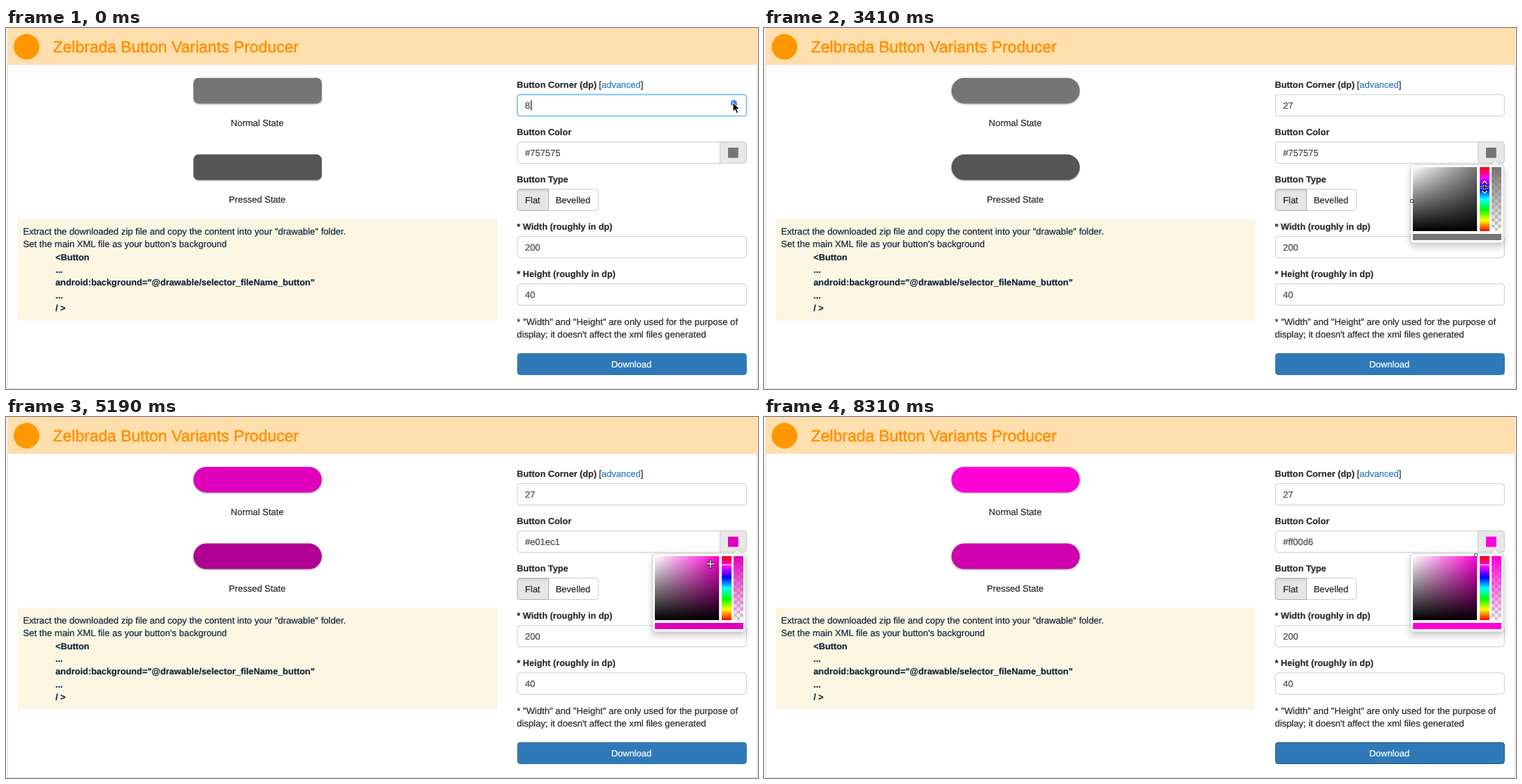
Write an HTML page that moves like this. It is 1079 px wide and 519 px high and loops after 8910 ms.

```html
<!DOCTYPE html>
<html lang="en">
<head>
<meta charset="utf-8">
<title>Button Variants Producer</title>
<style>
  html, body { margin: 0; width: 100%; height: 100%; overflow: hidden; background: #fff; }
  svg { display: block; width: 100%; height: 100%; }
  text {
    font: 13px "Liberation Sans", Arial, sans-serif; white-space: pre;
    text-rendering: geometricPrecision;
    color: #2b2b2b; fill: currentColor; stroke: currentColor; stroke-width: .22;
  }
  .title { font-size: 23px; color: #ff9100; stroke-width: .6; }
  .bold { font-size: 12.8px; font-weight: 700; }
  .note { font-size: 13.13px; }
  .code text { color: #12263a; }
  .mid { text-anchor: middle; }
  .value { color: #484848; }
  .field { fill: #fff; stroke: #ccc; }
  .field.focus { stroke: #5aaeef; stroke-width: 1.2; filter: drop-shadow(0 0 2.5px rgba(102, 175, 233, .4)); }
  .shape { filter: drop-shadow(0 1px 1px rgba(0, 0, 0, .38)); }
  .panel { filter: drop-shadow(0 5px 5px rgba(0, 0, 0, .2)); }
  .download { fill: #2f79b9; stroke: #2e6da4; }
  .download.hover { fill: #286090; stroke: #204d74; }
  .download.down { fill: #204d74; stroke: #122b40; }
  .download.done { stroke: #1f4a70; }
  .line { fill: none; stroke: #000; }
  .halo { fill: none; stroke: #fff; stroke-width: 3; }
  .solid { stroke: #fff; stroke-width: 1; stroke-linejoin: round; }
</style>
</head>
<body>
<svg viewBox="0 0 1079 519" preserveAspectRatio="none">
  <defs>
    <linearGradient id="white">
      <stop stop-color="#fff"/><stop offset="1" stop-color="#fff" stop-opacity="0"/>
    </linearGradient>
    <linearGradient id="black" x2="0" y2="1">
      <stop stop-color="#000" stop-opacity="0"/><stop offset="1"/>
    </linearGradient>
    <linearGradient id="rainbow" x2="0" y2="1">
      <stop stop-color="#f00"/><stop offset=".167" stop-color="#f0f"/>
      <stop offset=".333" stop-color="#00f"/><stop offset=".5" stop-color="#0ff"/>
      <stop offset=".667" stop-color="#0f0"/><stop offset=".833" stop-color="#ff0"/>
      <stop offset="1" stop-color="#f00"/>
    </linearGradient>
    <linearGradient id="fade" x2="0" y2="1">
      <stop class="tint"/><stop class="tint" offset="1" stop-opacity="0"/>
    </linearGradient>
    <linearGradient id="inset" x2="0" y2="1">
      <stop stop-color="#d2d2d2"/><stop offset=".16" stop-color="#e6e6e6"/>
    </linearGradient>
    <pattern id="checker" x="1044" y="200" width="9.2" height="9.2" patternUnits="userSpaceOnUse">
      <path fill="#fff" d="M0 0h9.2v9.2H0z"/>
      <path fill="#ccc" d="M0 0h4.6v4.6H0zM4.6 4.6h4.6v4.6H4.6z"/>
    </pattern>
  </defs>

  <!-- page and header -->
  <path fill="#f6f6f6" d="M0 0h2v519H0zM1078 0h1v519h-1z"/>
  <path fill="#ffdfae" d="M2 0h1076v53H2z"/>
  <path class="line" style="stroke:#ddd" d="M2.5 53V518.5H1077.5V53"/>
  <circle cx="29.5" cy="27" r="18.5" fill="#ff9800"/>
  <text class="title" x="67.5" y="35">Zelbrada Button Variants Producer</text>

  <!-- previews -->
  <rect id="normal" class="shape" x="269" y="71.7" width="184" height="36.8"/>
  <text class="mid" x="360.5" y="140.5">Normal State</text>
  <rect id="pressed" class="shape" x="269" y="181.8" width="184" height="36.8"/>
  <text class="mid" x="360.5" y="250.8">Pressed State</text>

  <!-- instructions -->
  <path fill="#fcf6e2" d="M16.5 274H705V420.5H16.5z"/>
  <g class="code">
    <text class="note" x="24.5" y="296.8">Extract the downloaded zip file and copy the content into your "drawable" folder.</text>
    <text class="note" x="24.5" y="315.1">Set the main XML file as your button's background</text>
    <text class="bold" x="71" y="333.5">&lt;Button</text>
    <text class="bold" x="71" y="351.8">...</text>
    <text class="bold" x="71" y="370.2">android:background="@drawable/selector_fileName_button"</text>
    <text class="bold" x="71" y="388.5">...</text>
    <text class="bold" x="71" y="406.9">/ &gt;</text>
  </g>

  <!-- form -->
  <text class="bold" x="733" y="86.4">Button Corner (dp)</text>
  <text x="850.8" y="86.4">[<tspan style="color:#337ab7">advanced</tspan>]</text>
  <rect id="corner" class="field" x="733.8" y="95.8" width="328.5" height="30.7" rx="4"/>
  <text id="radius" class="value" x="744.8" y="115.6"></text>
  <path id="caret" class="line" d="M753.5 104V118.5"/>
  <g id="spinner">
    <rect x="1040.5" y="104.5" width="8" height="13.5" rx="4" fill="#fff" stroke="#ddd"/>
    <path id="spinUp" fill="#3b8ff0" d="M1040 111v-3a4.5 4.5 0 0 1 9 0v3z"/>
    <path class="line" style="stroke:#666" d="M1042.5 109.3l2-2.2 2 2.2M1042.5 113.2l2 2.2 2-2.2"/>
  </g>

  <text class="bold" x="733" y="154.4">Button Color</text>
  <rect class="field" x="733.8" y="163.8" width="328.5" height="30.7" rx="4"/>
  <path fill="#e8e8e8" stroke="#ccc" d="M1024.5 163.8H1058.3a4 4 0 0 1 4 4V190.5a4 4 0 0 1-4 4H1024.5z"/>
  <text id="hex" class="value" x="744.8" y="183.6"></text>
  <rect class="paint" x="1036" y="172" width="14.7" height="14.7"/>

  <text class="bold" x="733" y="222.4">Button Type</text>
  <rect class="field" x="733.8" y="231.8" width="116.2" height="30.7" rx="4"/>
  <path fill="url(#inset)" stroke="#adadad" d="M778.5 231.8H737.8a4 4 0 0 0-4 4V258.5a4 4 0 0 0 4 4H778.5z"/>
  <text x="744.8" y="251.7">Flat</text>
  <text x="788.7" y="251.7">Bevelled</text>

  <text class="bold" x="733" y="290.4">* Width (roughly in dp)</text>
  <rect class="field" x="733.8" y="299.8" width="328.5" height="30.7" rx="4"/>
  <text class="value" x="744.8" y="319.6">200</text>
  <text class="bold" x="733" y="358.4">* Height (roughly in dp)</text>
  <rect class="field" x="733.8" y="367.8" width="328.5" height="30.7" rx="4"/>
  <text class="value" x="744.8" y="387.6">40</text>
  <text class="note" x="733" y="426.5">* "Width" and "Height" are only used for the purpose of</text>
  <text class="note" x="733" y="444.8">display; it doesn't affect the xml files generated</text>
  <rect id="download" x="734" y="468" width="328.3" height="30.4" rx="3.7"/>
  <text class="mid" x="897.3" y="487.7" style="color:#fff">Download</text>

  <!-- colour picker -->
  <g id="picker">
    <g class="panel">
      <rect x="927.5" y="196.5" width="134" height="112.5" rx="4" fill="#fff" stroke="#ccc"/>
      <path fill="#fff" stroke="#ccc" d="M1043.5 196.5l6-6 6 6"/>
    </g>
    <rect id="base" x="931" y="200" width="92" height="92"/>
    <path fill="url(#white)" d="M931 200h92v92h-92z"/>
    <path fill="url(#black)" d="M931 200h92v92h-92z"/>
    <path fill="url(#rainbow)" d="M1027 200h14v92h-14z"/>
    <rect id="hueMark" x="1027" width="14" height="1.2" fill="#fff"/>
    <path fill="url(#checker)" d="M1044 200h14v92h-14z"/>
    <path fill="url(#fade)" d="M1044 200h14v92h-14z"/>
    <rect class="paint" x="931" y="296" width="127" height="9"/>
    <g id="ring" fill="none">
      <circle r="2.3" stroke="#000"/><circle r="1.4" stroke="#fff" stroke-width=".9"/>
    </g>
  </g>

  <!-- pointer shapes -->
  <g id="cursor">
    <path id="arrow" class="solid" d="M0 0V13.2L3 10.4 5.3 15.6 7.7 14.6 5.5 9.5H9.5z"/>
    <g id="resize">
      <path class="halo" d="M-6.5 0H6.5M0-7V7M-2.5-4.5L0-7.2 2.5-4.5M-2.5 4.5L0 7.2 2.5 4.5"/>
      <path class="line" stroke-width="1.5" d="M-6.5 0H6.5M0-6V6"/>
      <path d="M-3-4L0-7.7 3-4zM-3 4L0 7.7 3 4z"/>
    </g>
    <g id="cross">
      <path class="line" stroke-width="3" d="M-6.5 0H6.5M0-6.5V6.5"/>
      <path class="line" style="stroke:#fff" stroke-width="1.5" d="M-6 0H6M0-6V6"/>
    </g>
    <path id="hand" d="M-1.5 1Q0-1 1.5 1V6L8 7.5Q9.5 8 9.2 10L8 14V17H-1V15L-5.5 9.5Q-5 7-1.5 10z"
      fill="#fff" stroke="#000" stroke-linejoin="round"/>
  </g>
</svg>
<script>
const LOOP = 8910, STEP = 148.4, LEAD = 12;
const SQUARE = { x: 931, y: 200, size: 92 };
const $ = id => document.getElementById(id);
const clamp = v => Math.max(0, Math.min(1, v));
const show = (id, on) => $(id).style.display = on ? '' : 'none';

// Pointer path: step, x, y
const path = [
  [0, 1043, 107], [9, 1043, 107], [12, 1053, 143], [15, 1044, 176], [17, 1043, 178],
  [19, 1043, 178], [23, 1034, 229], [24, 1034, 229], [27, 1036.5, 214], [28, 1036.5, 212.87],
  [29, 1036.5, 212.87], [32, 1003, 228], [35, 1010.67, 211.19], [37, 1013, 207.5],
  [40, 1020, 202], [42, 1030, 189], [48, 1030, 189], [52, 935, 481], [54, 935, 481], [60, 935, 483]
];

function pointerAt(step) {
  const i = Math.max(1, path.findIndex(p => p[0] >= step));
  const [a, x0, y0] = path[i - 1], [b, x1, y1] = path[i];
  const k = (step - a) / (b - a);
  return { x: x0 + (x1 - x0) * k, y: y0 + (y1 - y0) * k };
}

function hueAt(step) {
  if (step < 25) return 0;
  const { y } = pointerAt(Math.min(step, 28));
  return 360 * (1 - (y - SQUARE.y) / SQUARE.size);
}

function pickAt(step) {
  if (step < 32) return { s: 0, v: 117 / 255 };
  const { x, y } = pointerAt(Math.min(step, 42));
  return { s: clamp((x - SQUARE.x) / SQUARE.size), v: clamp(1 - (y - SQUARE.y) / SQUARE.size) };
}

function toHex(h, s, v) {
  const channel = n => {
    const k = (n + h / 60) % 6;
    const c = v * (1 - s * clamp(Math.min(k, 4 - k)));
    return Math.round(c * 255).toString(16).padStart(2, '0');
  };
  return '#' + channel(5) + channel(3) + channel(1);
}

function darker(h, s, v) {
  const l = v * (1 - s / 2);
  const sat = (v - l) / Math.min(l, 1 - l);
  return `hsl(${h}, ${sat * 100}%, ${(l - .094) * 100}%)`;
}

// Screen colours look more saturated than their hex value
const vivid = s => Math.min(1, s * 1.155);

function pointerKind(step) {
  if (step >= 56) return 'none';
  if (step >= 52) return 'hand';
  if (step >= 42 || step < 22) return 'arrow';
  return step < 31 ? 'resize' : 'cross';
}

function render(step) {
  const corner = step < 1 ? 8 : Math.min(27, 6 + 3 * step);
  const hue = hueAt(step), { s, v } = pickAt(step);
  const color = toHex(hue, vivid(s), v);
  const focused = step < 15;

  for (const id of ['normal', 'pressed']) $(id).setAttribute('rx', Math.min(18.4, corner * .92));
  $('normal').setAttribute('fill', color);
  $('pressed').setAttribute('fill', step < 25 ? '#555' : darker(hue, vivid(s), v));
  document.querySelectorAll('.paint').forEach(e => e.setAttribute('fill', color));
  document.querySelectorAll('.tint').forEach(e => e.setAttribute('stop-color', color));

  $('radius').textContent = corner;
  $('hex').textContent = toHex(hue, s, v);
  $('corner').setAttribute('class', focused ? 'field focus' : 'field');
  show('caret', step < 1);
  show('spinner', focused);
  show('spinUp', step < 7);

  show('picker', step >= 16);
  $('base').setAttribute('fill', step < 25 ? color : `hsl(${hue}, 100%, 50%)`);
  show('hueMark', step >= 25);
  $('hueMark').setAttribute('y', SQUARE.y + SQUARE.size * (1 - hue / 360) - 1);
  $('ring').setAttribute('transform',
    `translate(${SQUARE.x + s * SQUARE.size - 1.5} ${SQUARE.y + (1 - v) * SQUARE.size - 1.2})`);

  const state = step >= 56 ? 'done' : step >= 55 ? 'down' : step >= 52 ? 'hover' : '';
  $('download').setAttribute('class', 'download ' + state);

  const { x, y } = pointerAt(step), kind = pointerKind(step);
  $('cursor').setAttribute('transform', `translate(${x} ${y})`);
  for (const id of ['arrow', 'resize', 'cross', 'hand']) show(id, id === kind);
}

const start = performance.now();
function tick() {
  const time = (performance.now() - start) % LOOP;
  render(Math.min(59, Math.floor((time + LEAD) / STEP)));
  requestAnimationFrame(tick);
}
tick();
</script>
</body>
</html>
```
